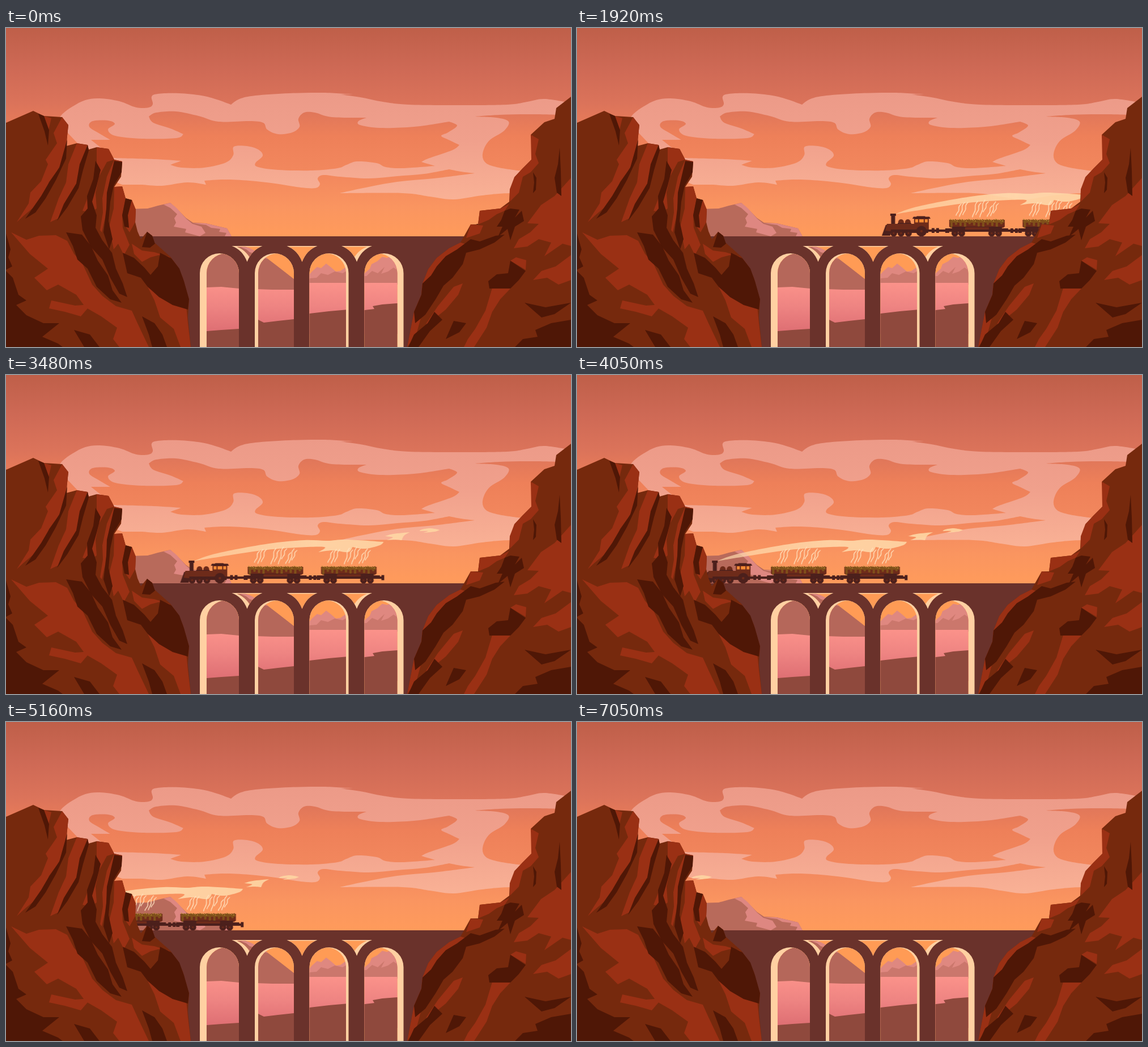
An HTML page that plays this animation: 997 by 562 pixels, repeating every 7080 ms.

```html
<!DOCTYPE html>
<html lang="en">
<head>
<meta charset="utf-8">
<title>Canyon train</title>
<style>
  html, body { margin: 0; width: 100%; height: 100%; overflow: hidden; background: #ff9a5c; }
  svg { display: block; width: 100vw; height: 100vh; }
  .mid { fill: #76290d; }
  .light { fill: #9a3014; }
  .dark { fill: #4f1706; }
  .bridge { fill: #6a322b; }
  .cream { fill: #ffd0a2; }
  .iron { fill: #4c201c; }
  .body { fill: #6e2b1a; }
  .steam { fill: none; stroke: #ffe3c0; stroke-width: 1.3; stroke-linecap: round; }
</style>
</head>
<body>
<svg viewBox="0 0 997 562" preserveAspectRatio="none">
  <defs>
    <linearGradient id="sky" gradientUnits="userSpaceOnUse" x1="0" y1="0" x2="0" y2="367">
      <stop offset="0" stop-color="#bf5f49"/>
      <stop offset=".19" stop-color="#ce6955"/>
      <stop offset=".36" stop-color="#db735a"/>
      <stop offset=".52" stop-color="#ee8059"/>
      <stop offset=".72" stop-color="#f3895e"/>
      <stop offset=".86" stop-color="#fa9560"/>
      <stop offset="1" stop-color="#ff9b5b"/>
    </linearGradient>
    <linearGradient id="cloud" gradientUnits="userSpaceOnUse" x1="0" y1="114" x2="0" y2="302">
      <stop offset="0" stop-color="#ec9a88"/>
      <stop offset=".45" stop-color="#f0a08c"/>
      <stop offset="1" stop-color="#f9b195"/>
    </linearGradient>
    <linearGradient id="water" gradientUnits="userSpaceOnUse" x1="0" y1="449" x2="0" y2="532">
      <stop offset="0" stop-color="#fb928a"/>
      <stop offset=".5" stop-color="#ee8482"/>
      <stop offset="1" stop-color="#df7074"/>
    </linearGradient>
    <linearGradient id="smoke" gradientUnits="userSpaceOnUse" x1="420" y1="0" x2="855" y2="0">
      <stop offset="0" stop-color="#ffdcae" stop-opacity=".65"/>
      <stop offset=".5" stop-color="#ffd9ab" stop-opacity=".9"/>
      <stop offset="1" stop-color="#ffd5a2" stop-opacity=".9"/>
    </linearGradient>
    <clipPath id="openings"><path id="openPath"/></clipPath>
    <clipPath id="views"><path id="viewPath"/></clipPath>
  </defs>

  <rect width="997" height="562" fill="url(#sky)"/>
  <path id="clouds" fill="url(#cloud)" fill-rule="evenodd"/>

  <!-- far mountains above the deck -->
  <path fill="#b86a5b" d="M215 319L250 318 268 313 290 308 304 321 318 335 330 343 352 344 390 353 398 367H215z"/>
  <path fill="#de8781" d="M278 311L290 308 301 317 318 336 329 345 345 350 352 361 342 367 316 360 318 354 296 350 300 343 297 335 302 328 290 317z
    M329 344L352 344 390 353 398 367H386L389 361 376 359 378 354 362 352 353 347z"/>

  <g id="train">
    <path id="smokePath" fill="url(#smoke)"/>
    <g id="cars"></g>
    <g id="engine">
      <path class="iron" d="M396 366L403 347H412V357H478V361H411V366z M411 327H421V331H419.500V345H412.500V331H411z M476 355H519V359H476z M484 352.500H489V361H484z M492 352.500H497V361H492z M508 353H515V361H508z"/>
      <path class="body" d="M405 345H453V336H479V358H410L402 357z M425 345V342a5 5 0 0 1 10 0V345z M437 345V342a5 5 0 0 1 10 0V345z"/>
      <path class="iron" d="M450 336L452 332.500H457L458 331.500H472L473 332.500H480L482 336z M424 343.500H436V345H424z M436 343.500H448V345H436z M412 355H479V358H412z"/>
      <path fill="#f58a35" d="M455 337H460V342.500H455z M462 337H470V342.500H462z M472 337H477V342.500H472z"/>
      <g class="iron"><circle cx="417" cy="361.500" r="6"/><circle cx="430" cy="361.500" r="6"/><circle cx="443" cy="361.500" r="6"/><circle cx="466" cy="358" r="9.300"/></g>
      <g class="body"><circle cx="417" cy="361.500" r="1.700"/><circle cx="430" cy="361.500" r="1.700"/><circle cx="443" cy="361.500" r="1.700"/><circle cx="466" cy="358" r="2.300"/></g>
    </g>
  </g>

  <path class="bridge" d="M225 367H830V562H225z"/>
  <path id="rims" class="cream"/>
  <g clip-path="url(#openings)"><g clip-path="url(#views)">
    <rect x="330" y="380" width="380" height="182" fill="#ff9b55"/>
    <path fill="#df8880" d="M530 440L541 428 549 421 556 423 565 415 574 422 582 429 590 428 600 421 612 432 633 432 642 424 645 416 655 411 664 403 672 405 680 402 690 411 705 418V452H530z"/>
    <path fill="#cb776c" d="M530 450L536 441 548 440 556 432 568 435 580 429 594 432 606 425 618 437 636 437 646 428 656 432 668 421 662 433 674 429 684 422 692 428 705 424V452H530z"/>
    <rect x="330" y="449" width="380" height="90" fill="url(#water)"/>
    <path fill="#b5675a" d="M330 380H412L430 389 452 399 482 422 509 443V461L470 461 411 459 380 456 330 458z"/>
    <path fill="#de8781" d="M410 384L428 387 447 396 462 407 451 404 446 399 430 395 424 390z"/>
    <path fill="#8f493d" d="M330 537L354 534 380 532 411 530 430 522 445 514 455 519 480 516 508 513 536 503 570 499 604 496 633 497 650 495 647 490 664 487 690 485 710 483V562H330z"/>
  </g></g>

  <!-- left cliff -->
  <path class="mid" d="M0 167L48 146 67 155 99 157 110 171 106 208 125 203 144 206 146 214 160 210 181 213 191 232 205 235 203 262 191 280 205 279 211 300 222 303 229 320 228 342 232 358 238 372 249 359 258 366 262 378 290 403 303 420 312 440 323 478 321 510 326 562H0z"/>
  <path class="light" d="M67 155L80 159 75 180z M99 157L110 171 107 200 104 228 90 252 76 271 70 288 50 315 32 330 19 342 40 309 43 290 62 270 74 240 70 232 90 203 84 185z
    M125 203L144 206 146 216 133 243 129 270 110 300 93 335 78 342 93 300 106 272 110 240z
    M160 210L181 213 191 232 178 236 164 262 158 290 160 318 149 325 135 322 146 294 157 264 160 240z
    M191 232L205 235 203 250 187 271 179 300 175 334 169 360 166 356 171 325 170 300 178 262z
    M191 280L205 279 211 300 205 330 206 352 218 382 208 400 198 380 190 390 182 350 190 318z"/>
  <path class="light" d="M222 303L229 320 228 342 218 360 211 350 213 326z M9 360L36 373 58 366 88 365 108 375 120 398 134 413 152 452 170 472 194 490 222 498 232 520 252 562H200L189 548 196 528 168 508 140 492 124 470 92 452 72 462 50 440 74 424 42 398z
    M222 380L240 392 262 395 288 403 306 428 312 446 290 430 270 400 255 404 240 412 226 398z
    M245 446L275 474 318 490 321 520 326 562H308L296 530 272 510 262 480z
    M80 480L122 489 150 487 132 508 104 500 76 494z"/>
  <path class="dark" d="M57 151L67 155 76 180 74 207 68 182z M108 196L106 230 88 268 70 300 52 325 34 336 62 296 76 272 94 246z
    M144 206L146 216 136 250 128 282 108 316 90 340 102 310 124 274 130 240z
    M158 234L167 250 160 278 152 306 160 330 158 352 170 374 187 396 194 424 206 450 214 474 200 468 184 440 170 408 150 386 135 356 132 332 144 318 143 296 154 266z"/>
  <path class="dark" d="M191 234L205 236 204 254 190 278 184 306 181 340 188 372 182 390 172 360 177 320 178 290z
    M211 300L222 303 215 330 217 352 209 350 205 330z M249 359L258 366 263 380 254 387 240 386z
    M206 396L226 405 244 422 255 435 268 420 272 396 292 406 306 424 314 446 323 478 321 496 294 488 270 474 250 456 238 440 214 432z
    M106 360L134 364 150 384 162 410 180 436 188 462 204 484 184 478 160 456 144 424 126 408 118 384z"/>
  <path class="dark" d="M0 362L8 390 4 404 11 420 0 426z M0 428L12 440 22 470 36 480 18 488 36 506 66 520 94 520 64 544 92 556 100 562H0z
    M240 508L262 520 276 540 284 562H258L252 540z M120 532L148 540 165 562H138z"/>

  <!-- right cliff -->
  <path class="mid" d="M997 121L971 141 968 160 950 166 926 188 929 210 927 232 912 247 897 263 896 276 889 284 888 306 872 318 836 322 833 346 820 346 802 378 782 388 760 405 745 425 735 450 733 470 720 500 708 562H997z"/>
  <path class="light" d="M836 322L872 318 888 310 880 322 866 328 852 338 833 346z M820 346L842 348 836 362 812 370z
    M997 264L968 296 944 312 920 344 940 345 925 360 905 372 896 388 920 385 940 372 962 378 950 402 982 380 997 384z
    M926 188L940 196 934 222 940 238 926 254 912 262 905 290 889 306 889 284 897 263 912 247 927 232z
    M802 378L822 384 800 398 786 420 768 432 752 455 748 480 735 500 724 540 708 562 720 500 733 470 735 450 745 425 760 405 782 388z"/>
  <path class="light" d="M890 410L900 404 918 409 917 426z M858 458L890 459 872 478 858 500 848 528 826 562H808L815 548 828 530 846 498z
    M997 400L970 420 945 428 930 444 955 440 975 452 997 444z M790 456L806 450 798 470 776 496 756 512 736 540 742 520 762 490z"/>
  <path class="dark" d="M977 211L979 252 980 296 972 290 968 264 974 240z M930 254L936 264 935 285 930 291 932 272z
    M880 322L890 318 906 320 898 334 910 322 914 340 898 350 890 374 885 354 868 368 876 350 866 350 874 338z
    M820 372L836 376 864 366 880 364 862 378 836 390 812 396 806 416 788 440 772 454 758 478 740 505 722 520 720 500 733 470 735 450 750 436 760 420 776 402 796 390z"/>
  <path class="dark" d="M890 410L917 428 905 444 890 459H853L851 446 866 434 886 432z M915 484L952 492 997 484 968 504 945 510z
    M997 514L962 520 934 532 938 544 912 548 898 562H997z M720 540L744 520 756 500 770 514 748 534 728 562H710z M790 516L812 520 800 536 776 548z"/>
</svg>

<script>
const LOOP = 7080, STEP = 30, SPEED = 0.1477, POSE = 2880;
const $ = id => document.getElementById(id);
const setPath = (id, d) => $(id).setAttribute('d', d);

// Smooth curve through points; "/" marks a sharp corner.
function curve(text) {
  let last, d = '';
  for (const part of text.split('/')) {
    const p = part.trim().split(/\s+/).map(s => s.split(',').map(Number));
    if (last) p.unshift(last); else d = 'M' + p[0];
    for (let i = 0; i + 1 < p.length; i++) {
      const a = p[i - 1] || p[i], b = p[i], c = p[i + 1], e = p[i + 2] || c;
      const h1 = b.map((v, k) => v + (c[k] - a[k]) / 6);
      const h2 = c.map((v, k) => v - (e[k] - b[k]) / 6);
      d += `C${h1} ${h2} ${c}`;
    }
    last = p[p.length - 1];
  }
  return d + 'z';
}

const cloudEdge = curve(`90,165 100,151 118,138 140,127 165,124 200,129 230,140 252,140 259,134 257,121 268,116
  305,115 345,119 372,126 397,135 / 412,125 440,119 500,115 560,114 614,117 / 590,117 / 625,122 665,130 710,135
  800,136 885,135 920,130 950,125 997,132 / 997,290 / 889,291 840,295 790,302 748,297 700,291 589,291 /
  630,282 690,271 755,265 827,256 / 803,253 782,249 / 738,257 690,261 640,265 590,262 560,259 550,265 554,275 546,282
  520,281 475,274 430,269 385,267 350,269 / 353,276 / 320,272 275,278 240,276 / 205,276 / 190,270`);
const gap = curve(`252,156 265,149 300,147 340,155 375,165 430,164 454,167 461,179 480,187 505,184 518,174 516,160 526,149
  545,149 575,157 636,158 / 622,164 625,171 660,176 720,174 782,165 / 796,172 780,184 768,190 781,197 800,206 /
  788,215 745,230 733,236 / 757,243 / 700,247 670,245 654,238 620,235 601,241 585,247 540,251 480,250 445,245 440,238
  453,225 445,214 425,208 402,209 401,224 388,237 350,246 310,246 290,241 / 309,234 / 260,231 190,229 / 150,197 / 184,197 /
  165,186 147,174 153,164 180,163 192,169 180,179 193,190 240,195 300,194 313,187 / 290,177 260,167 252,156`);
const rightGap = curve(`826,156 / 865,158 887,165 879,181 852,199 841,222 847,238 870,246 910,252 / 975,200 / 975,153 / 920,152 870,153 826,156`);
setPath('clouds', cloudEdge + gap + rightGap);

setPath('smokePath',
  curve(`419,328 / 450,317 500,306 560,296 615,291 655,292 690,290 755,294 / 748,300 722,306 700,303 / 692,312 665,309 640,312 /
    650,303 600,304 540,309 480,318 419,328`) +
  curve('757,284 / 772,280 801,277 / 791,283 787,291 / 773,290 761,291 / 771,286 757,284') +
  curve('818,275 / 823,272 838,270 854,273 / 845,276 824,278 / 833,275 818,275'));

// Arches and the gaps above the piers: [x, view shift]
const arch = x => `M${x} 562V432a34.5 35 0 0 1 69 0V562z`;
const spandrel = (x, y) =>
  `M${x - 27} ${y}H${x + 27}Q${x + 8} ${y + 7} ${x} ${y + 28}Q${x - 8} ${y + 7} ${x - 27} ${y}z`;
const arches = [[342, 12], [439, 6], [535.5, -4.5], [632.5, -11]];
const spandrels = [[425.5, 9], [522.5, 0], [619, -9]];
const opened = arches.map(([x]) => arch(x)).join('') + spandrels.map(([x]) => spandrel(x, 384)).join('');
const viewed = arches.map(([x, s]) => arch(x + s)).join('') +
  spandrels.map(([x, s]) => spandrel(x + s, 385.5)).join('');
setPath('rims', opened);
setPath('openPath', opened);
setPath('viewPath', viewed);

function strand(x, y, h) {
  return `M${x} ${y}c1 ${-h * .25} 6 ${-h * .3} 5 ${-h * .58}s2 ${-h * .25} 4 ${-h * .42}`;
}

function car(x) {
  let cargo = `M${x + 1} 339`, grains = '', wheels = '', steam = '';
  for (let i = 0; i < 24; i++) {
    cargo += `q2 ${-3 - i * 7 % 3} 4 0`;
    const gx = x + 2 + i * 4, gy = 337 + i * 5 % 4;
    grains += `<circle cx="${gx}" cy="${gy}" r="1"/>`;
  }
  cargo += 'v4';
  for (let i = 0; i < 12; i++) {
    const drop = 2 + i * 5 % 7;
    cargo += `h-3v${drop}q-2 2 -4 0v${-drop}h-1`;
  }
  for (const w of [10, 22, 75, 87])
    wheels += `<circle class="iron" cx="${x + w}" cy="361.500" r="6"/><circle class="body" cx="${x + w}" cy="361.500" r="1.600"/>`;
  [[12, 330, 20], [18, 332, 25], [24, 329, 22], [41, 333, 28], [47, 329, 21], [54, 333, 30], [60, 324, 18],
   [67, 332, 19], [73, 331, 25], [78, 326, 17]].forEach(([sx, y, h]) => steam += strand(x + sx, y, h));
  return `<path class="body" d="M${x} 338h98v12l-3 2h-92l-3 -2z"/>
    <path fill="#80501a" d="${cargo}z"/><g fill="#b58a35">${grains}</g>
    <path class="iron" d="M${x - 3} 353h8v-3h88v3h11v2h11v4h-118z M${x + 108} 353h5v8h-5z M${x + 116} 353h5v8h-5z"/>
    <path class="body" d="M${x + 28} 351h42v4h-42z"/>${wheels}
    <path class="steam" d="${steam}"/>`;
}
const link = '<path class="iron" d="M614 355H648V359H614z M637 353H643V361H637z M742 355H756V359H742z M751 352.500H756V361.500H751z"/>';
$('cars').innerHTML = car(515) + car(644.5).replace('M752.5 353h5v8h-5z', '').replace('M760.5 353h5v8h-5z', '').replace('h11v2h11v4h-118z', 'h11v6h-107z') + link;

const shift = t => `translate(${((POSE - t) * SPEED).toFixed(2)}px, 0)`;
$('train').animate(
  [{ transform: shift(0) }, { transform: shift(LOOP) }],
  { duration: LOOP, iterations: Infinity, easing: `steps(${LOOP / STEP}, end)` });
</script>
</body>
</html>
```
